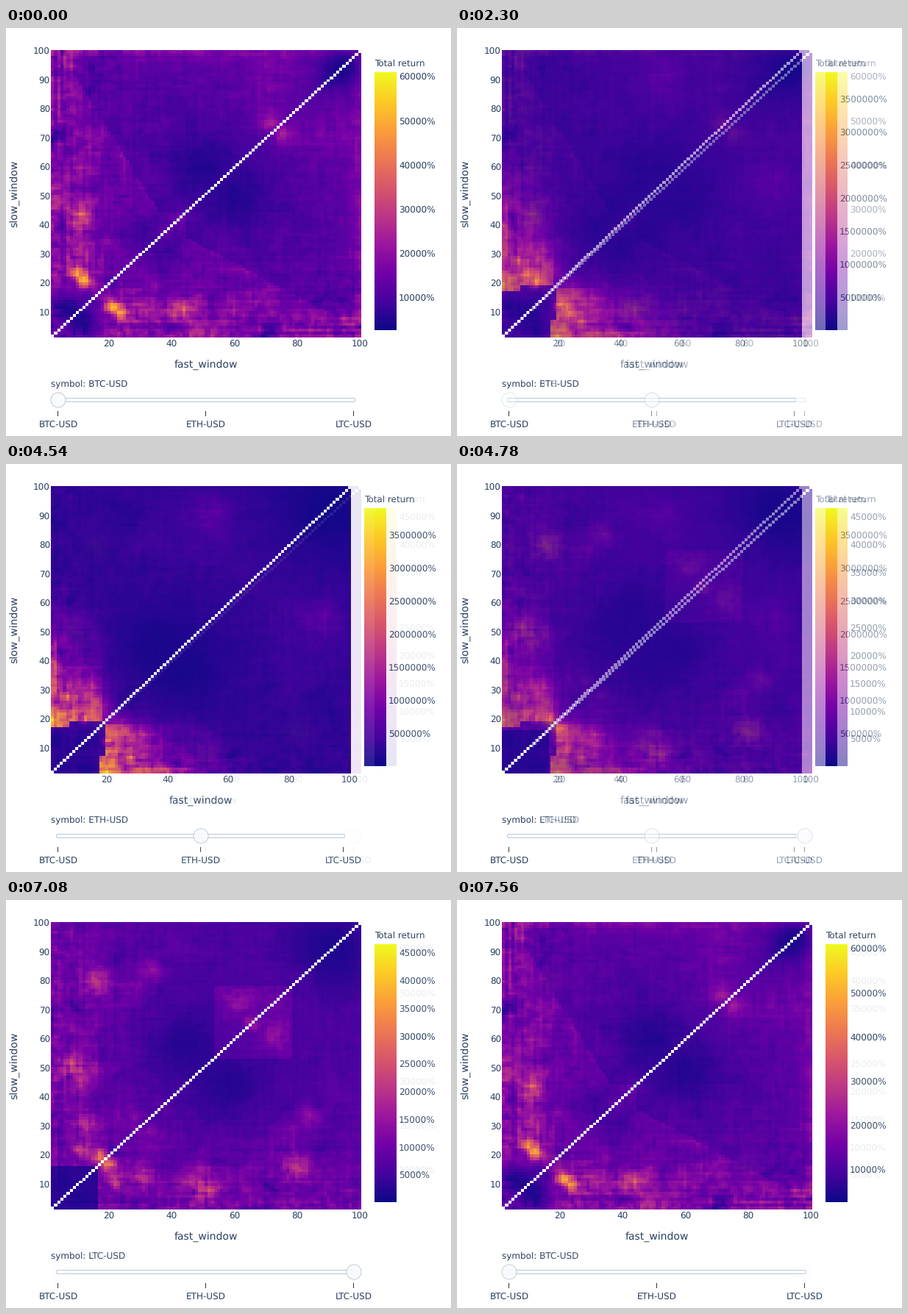
Write a matplotlib script that moves like this. It is 605 px wide and 555 px high and loops after 7620 ms.

```python
import numpy as np
import matplotlib.pyplot as plt
from matplotlib.animation import FuncAnimation
from matplotlib.colors import LinearSegmentedColormap
from matplotlib.patches import Circle, FancyBboxPatch, Rectangle

W, H, DPI = 605, 555, 72          # at 72 dpi a point is a pixel
LOOP, TICK = 7620, 20
HOLD, FADE, STEP, STEPS = 2000, 540, 60, 10

INK, RAIL, EDGE = "#2a3f5f", "#f8fafc", "#bec8d9"
LEFT, TOP, BOTTOM = 61, 30, 421
BAR_TOP, BAR_BOTTOM = 60, 411

plt.rcParams.update({"font.family": "DejaVu Sans", "text.hinting": "no_hinting"})

PLASMA = LinearSegmentedColormap.from_list("plasma10", [
    "#0d0887", "#46039f", "#7201a8", "#9c179e", "#bd3786",
    "#d8576b", "#ed7953", "#fb9f3a", "#fdca26", "#f0f921"], N=512)
PLASMA.set_bad("white")

N = 99
F, S = np.meshgrid(np.arange(2.0, 101), np.arange(2.0, 101))   # fast, slow


def spot(f, s, r, h):
    return h * np.exp(-((F - f) ** 2 + (S - s) ** 2) / r ** 2)


def grain(rng, ks, kf):
    """Unit-variance noise averaged over ks slow and kf fast windows."""
    a = rng.normal(size=(N + ks - 1, N + kf - 1))
    a = np.apply_along_axis(np.convolve, 0, a, np.ones(ks) / ks, "valid")
    a = np.apply_along_axis(np.convolve, 1, a, np.ones(kf) / kf, "valid")
    return a / a.std()


def weathered(v, seed):
    """Roughen a field, most at short windows, and mirror it on the diagonal."""
    rng = np.random.default_rng(seed)
    wild = np.exp(-F / 16)
    clumps = sum(grain(rng, k, k) for k in (2, 4, 8)) / np.sqrt(3)
    v = v * (1 + (0.08 + 0.18 * wild) * clumps
             + (0.03 + 0.12 * wild) * grain(rng, 24, 1)
             + 0.05 * grain(rng, 1, 12))
    v = np.where(S > F, v, v.T).clip(0, 1)
    v[F == S] = np.nan
    return v


def btc():
    inner = (S > 44) & (F > np.maximum(8, 9 + 0.57 * (92 - S)))
    v = 0.205 - 0.07 * inner
    v += 0.10 * np.exp(-F / 8) + 0.11 * np.exp(-(100 - S) / 4)
    v += spot(9.5, 24, 2, .40) + spot(12, 21, 2, .55) + spot(12, 29, 6, .12)
    v += spot(11, 43, 4, .20) + spot(72, 76, 4, .18) + spot(70, 89, 11, .08)
    v += spot(7, 11, 7, -.22) + spot(31, 37, 9, -.10)
    v += spot(50, 60, 12, -.09) + spot(95, 95, 9, -.14)
    return weathered(v, 4)


def eth():
    reach = 0.52 * np.exp(-((S - 19 + 0.8 * F) / 28) ** 2)
    reach *= np.where(F < 18.5, 1, 0.5 * np.exp(-((F - 18) / 6) ** 2))
    v = 0.06 + reach * (S > np.where(F < 8, 17.5, 19))
    v += spot(12.5, 20, 1.2, .45) + spot(6, 27.5, 1.5, .25) + spot(16, 24, 3, .12)
    v += spot(54, 91, 6, .10) + spot(48, 84, 18, .03)
    v += spot(92, 94, 14, -.05) + spot(36, 45, 13, -.045)
    return weathered(v, 11)


def ltc():
    v = 0.12 + 0.10 * np.exp(-F / 25) + 0.06 * ((F >= 54) & (S <= 78))
    v += spot(16, 79, 5, .28) + spot(34, 84, 4, .13) + spot(27, 76, 4, .10)
    v += spot(10, 50, 6, .22) + spot(14, 30, 4, .16) + spot(27, 32, 4, .13)
    v += spot(62, 73, 4, .13) + spot(65, 66, 2, .15)
    v += spot(17, 20, 2.5, .50) + spot(11, 22, 3, .30)
    v += spot(88, 93, 14, -.09) + spot(44, 57, 14, -.09)
    v[(F < 17) & (S < 16.5)] = 0.05
    return weathered(v, 23)


# name, field, plot right edge, colour bar range, colour bar tick step
SCENES = (
    ("BTC-USD", btc, 483, 2850, 61160, 10000),
    ("ETH-USD", eth, 469, 22000, 3922000, 500000),
    ("LTC-USD", ltc, 483, 232, 46720, 5000),
)

fig = plt.figure(figsize=(W / DPI, H / DPI), dpi=DPI, facecolor="white")


def render(index):
    name, field, right, lo, hi, step = SCENES[index]
    ax = fig.add_axes([0, 0, 1, 1])
    ax.set_xlim(0, W)
    ax.set_ylim(H, 0)
    ax.axis("off")

    def label(x, y, s, ha="left", size=12, **kw):
        ax.text(x, y, s, ha=ha, va="baseline", size=size, color=INK, **kw)

    def raster(values, extent):
        ax.imshow(values, cmap=PLASMA, vmin=0, vmax=1, extent=extent,
                  origin="lower", aspect="auto", interpolation="nearest")

    # heatmap with its axes
    raster(field(), (LEFT, right, BOTTOM, TOP))
    for k in range(20, 101, 20):
        label(LEFT + (k - 1.5) / N * (right - LEFT), 434, str(k), "center")
    for k in range(10, 101, 10):
        label(60, BOTTOM - (k - 1.5) / N * (BOTTOM - TOP) + 4.3, str(k), "right")
    label((LEFT + right) / 2, 462, "fast_window", "center", 14)
    label(15, (TOP + BOTTOM) / 2, "slow_window", "center", 14,
          rotation=90, rotation_mode="anchor")

    # colour bar
    x, height = right + 18, BAR_BOTTOM - BAR_TOP
    raster(np.linspace(0, 1, height)[:, None], (x, x + 30, BAR_BOTTOM, BAR_TOP))
    label(x, 52, "Total return")
    for v in range(step, hi + 1, step):
        label(x + 33, BAR_BOTTOM - (v - lo) / (hi - lo) * height + 4.3, f"{v}%")

    # slider
    label(61, 487, f"symbol: {name}")
    ax.add_patch(FancyBboxPatch((68.5, 503.5), right - 77, 5,
                                boxstyle="round,pad=0,rounding_size=2",
                                fc=RAIL, ec=EDGE, lw=1))
    stops = np.linspace(70.5, right - 10.5, len(SCENES))
    for sx, scene in zip(stops, SCENES):
        ax.add_patch(Rectangle((sx - .5, 521), 1, 7, fc="#333333", lw=0))
        label(sx + .5, 544, scene[0], "center")
    ax.add_patch(Circle((stops[index] + .5, 506), 10, fc=RAIL, ec=EDGE, lw=1))

    fig.canvas.draw()
    shot = np.array(fig.canvas.buffer_rgba())[..., :3].astype(float)
    ax.remove()
    return shot


shots = [render(i) for i in range(len(SCENES))]


def picture(t):
    """Each scene holds, then dissolves into the next in equal steps."""
    scene, local = divmod(t, HOLD + FADE)
    w = 0 if local < HOLD else ((local - HOLD) // STEP + 1) / STEPS
    following = (scene + 1) % len(shots)
    return shots[scene] * (1 - w) + shots[following] * w


screen = fig.figimage(shots[0].astype(np.uint8), origin="upper")


def update(i):
    screen.set_data(np.rint(picture(i * TICK)).astype(np.uint8))
    return [screen]


anim = FuncAnimation(fig, update, frames=LOOP // TICK, interval=TICK,
                     repeat=True, repeat_delay=0)
plt.show()
```
